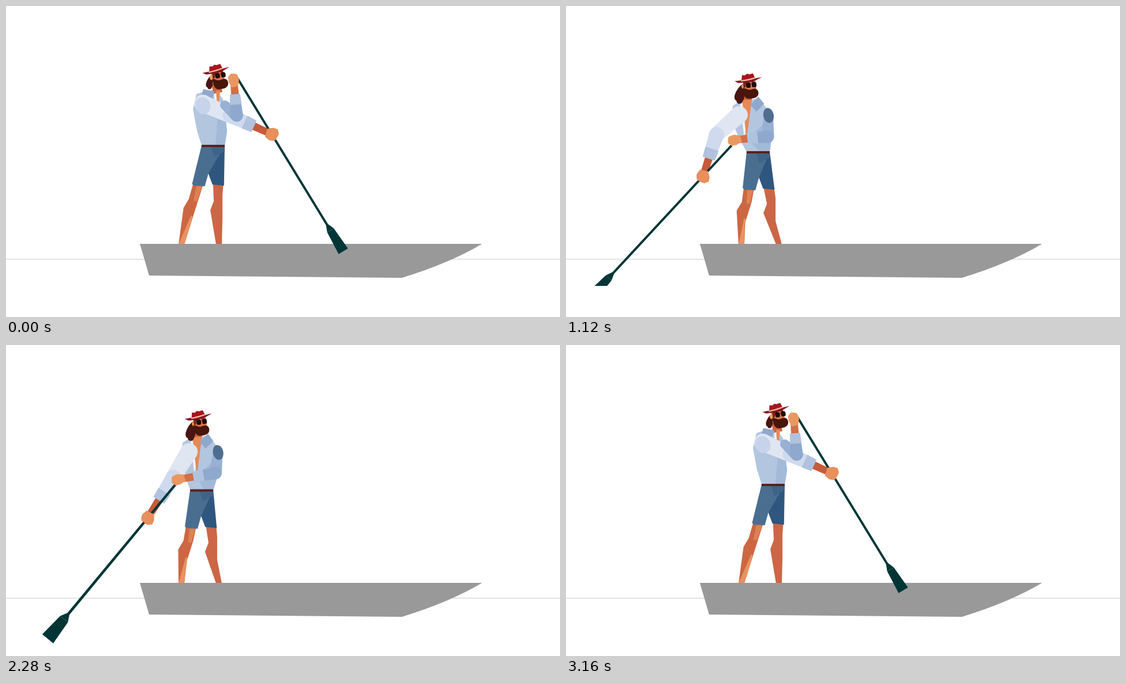
Recreate the animation shown at these times as an HTML page with a canvas. Size 960 by 540 pixels, loop 3240 ms.

```html
<!DOCTYPE html>
<html lang="en">
<head>
<meta charset="utf-8">
<title>Paddler</title>
<style>
html, body { margin: 0; width: 100%; height: 100%; overflow: hidden; background: #fff; }
canvas { display: block; width: 100%; height: 100%; }
</style>
</head>
<body>
<canvas id="stage" width="960" height="540"></canvas>
<script>
const ctx = document.getElementById('stage').getContext('2d');

// Head x, y, tilt; waist x, y; oar grip x, y, angle; oar swing towards the viewer;
// body turn towards the viewer; crouch. The rest of the body follows from these.
const REACH = [364, 112, -10, 359, 242, 399, 122, 58.6, 0, 0, 0];
const PLANT = [377, 127, -23, 345, 248, 425, 102, 68.8, 0, 0, 1];
const PULL = [341, 157, 9, 324, 258, 377, 174, 108, -.5, 0, 1];
const PUSH = [316, 128, -6, 333, 253, 287, 242, 132.8, 0, 1, 0];
const REST = [331, 125, -9, 338, 252, 281, 249, 134.7, 0, 1, 0];
const SWING = [350, 121, -9, 347, 248, 370, 192, 94.4, 1, .6, 0];
const KEYS = [[0, REACH], [320, PLANT], [640, PULL], [1120, PUSH],
              [1760, REST], [2200, REST], [2520, SWING], [3160, REACH]];

// Monotone cubic through the keys, so nothing overshoots a pose.
function poseAt(t) {
  const last = KEYS.length - 1;
  let k = 0;
  while (k < last - 1 && t >= KEYS[k + 1][0]) k++;
  const span = KEYS[k + 1][0] - KEYS[k][0], u = (t - KEYS[k][0]) / span;
  return REACH.map((_, c) => {
    const value = i => KEYS[i][1][c];
    const slope = i => (value(i + 1) - value(i)) / (KEYS[i + 1][0] - KEYS[i][0]);
    const tangent = i => {
      if (i < 1 || i >= last) return 0;
      const a = slope(i - 1), b = slope(i);
      return a * b <= 0 ? 0 : 2 * a * b / (a + b);
    };
    return value(k) + (value(k + 1) - value(k)) * u * u * (3 - 2 * u)
      + span * u * (1 - u) * (tangent(k) * (1 - u) - tangent(k + 1) * u);
  });
}

const off = ([x, y], dx, dy) => [x + dx, y + dy];
const mix = (a, b, k) => [a[0] + (b[0] - a[0]) * k, a[1] + (b[1] - a[1]) * k];
const angleOf = (a, b) => Math.atan2(b[1] - a[1], b[0] - a[0]);
const polar = ([x, y], angle, r) => [x + Math.cos(angle) * r, y + Math.sin(angle) * r];
const gap = (a, b) => Math.hypot(b[0] - a[0], b[1] - a[1]);

function poly(points, fill) {
  ctx.beginPath();
  for (const p of points) ctx.lineTo(...p);
  ctx.closePath();
  ctx.fillStyle = fill;
  ctx.fill();
}

function shape(path, fill) {
  ctx.fillStyle = fill;
  ctx.fill(new Path2D(path));
}

function oval([x, y], rx, ry, fill, turn = 0) {
  ctx.beginPath();
  ctx.ellipse(x, y, rx, ry, turn, 0, 7);
  ctx.fillStyle = fill;
  ctx.fill();
}

function taper(a, b, r1, r2, fill) {
  const side = angleOf(a, b) + Math.PI / 2;
  poly([polar(a, side, r1), polar(b, side, r2), polar(b, side, -r2), polar(a, side, -r1)], fill);
}

function local([x, y], angle, paint) {
  ctx.save();
  ctx.translate(x, y);
  ctx.rotate(angle);
  paint();
  ctx.restore();
}

function scene() {
  ctx.fillStyle = '#fff';
  ctx.fillRect(0, 0, 960, 540);
  ctx.fillStyle = '#ccc';
  ctx.fillRect(0, 439, 960, 1);
}

function drawLegs(waist, crouch) {
  const leg = (side, foot, bend) => {
    const hip = off(waist, side * 8, 8), ankle = [foot, 414];
    const knee = off(mix(hip, ankle, .54), bend * crouch, 0);
    return { ankle, knee, hem: mix(hip, knee, .69) };
  };
  const near = leg(-1, 304, 13), far = leg(1, 369, 17);
  const { hem, knee, ankle } = near, tilt = 1 - 6 * crouch;
  poly([off(far.hem, -9, -3), off(far.knee, -8, 0), off(far.knee, -14, 16), off(far.ankle, -5, 0),
        off(far.ankle, 5, 0), off(far.knee, 7, 30), off(far.knee, 7, -10), off(far.hem, 9, -3)], '#cb6646');
  poly([off(hem, -9, -3), off(knee, -9, -3), off(knee, -18, 12), off(ankle, -5, 0), off(ankle, 5, 0),
        off(knee, -3, 32), off(knee, 8, -3), off(hem, 9, -3)], '#cd6743');
  poly([off(knee, -5, 25), off(knee, -2, 27), off(knee, -4, 34), off(ankle, 5, 0), off(ankle, -5, 0)], '#e99260');
  taper(off(hem, 2, 0), off(knee, 2, 0), 5, 3, '#dd8152');

  const left = off(waist, -20, 0), right = off(waist, 20, 0), middle = off(waist, -4, 0);
  const crotch = off(mix(hem, far.hem, .5), 0, -20);
  poly([middle, right, off(far.hem, 10, tilt), off(far.hem, -10, -tilt), crotch], '#2f567f');
  poly([left, off(hem, -11, -2), off(hem, -8, 1), off(hem, 11, 2), crotch, mix(crotch, right, .5), right], '#4a6e90');
  poly([middle, right, off(right, 0, 10), off(middle, 6, 20)], '#3f6488');
}

function drawTorso(head, neck, waist, nearShoulder, farShoulder, turn, dip) {
  const left = off(waist, -20, 0), right = off(waist, 20, 0);
  const back = off(nearShoulder, -17 + 4 * turn, 10);
  const front = off(farShoulder, 0, 10), flank = off(mix(right, front, .4), 4, 0);
  const opening = [neck[0], neck[1] + (waist[1] - neck[1]) * (.45 + .3 * turn + .4 * dip)];
  const chest = [off(neck, -3 - 5 * turn, 0), off(neck, 4 + 5 * turn, 0), opening];
  poly([off(neck, -22 + 12 * turn, 1), off(nearShoulder, -11, -16), back, off(mix(back, left, .6), -2, 0),
        left, right, flank, front, off(farShoulder, -3, -10), off(neck, -3 + 24 * turn, -2)], '#b3c6df');
  poly([off(right, -16, 0), right, flank, front, opening], '#a2b9d8');
  poly(chest.map(p => off(p, -4, 0)), '#f1f5fa');
  taper(off(head, 0, 22), off(neck, 0, 4), 8, 8, '#cb633d');
  poly(chest, '#e58a57');
  local(off(neck, -17 + 36 * turn, 7), .2 - turn, () => shape('M-10 -8H10L8 8H-11Z', '#8fa9cd'));
  taper(off(left, 0, 1), off(right, 0, 1), 2, 2, '#5a211d');
}

function drawHead(head, tilt, turn, dip) {
  local(head, tilt * Math.PI / 180, () => {
    ctx.scale(1 + 1.1 * dip, 1 + .2 * dip);
    const hair = Math.max(0, .75 + .35 * turn - 2 * dip);
    local([-10, 9], 0, () => {
      ctx.scale(hair, hair);
      shape('M2 -4Q-10 2 -15 14Q-17 21 -13 23Q-13 29 -6 28Q0 22 1 14Z', '#481512');
    });
    shape('M-10 2H12V22H-8Z', '#db7547');
    oval([-10, 11], 3, 4, '#f0a05c');
    ctx.translate(1 - 2 * turn + 5 * dip, 0);
    shape('M-8 1H10V6L4 4L-3 6L-6 13H-9Z', '#6b2112');
    shape('M-10 13C-11 28 -7 34 1 33C10 34 16 31 16 24C16 17 10 16 6 17Q0 19 -5 15Z', '#48160a');
    shape('M-7 7L11 6V8H-7Z', '#d12a38');
    for (const x of [-4, 6]) {
      ctx.beginPath();
      ctx.roundRect(x, 5, 8, 9, 3);
      ctx.fillStyle = '#20090b';
      ctx.fill();
    }
    ctx.translate(2 * turn - 1 - 5 * dip, 0);
    shape('M-24 0Q0 0 24 -2L11 3Q-8 5 -18 4Z', '#87161f');
    shape('M-12 0L-10 -9L-5 -8Q-1 -12 2 -9L9 -10L12 -1Z', '#a8141f');
    shape('M-13 0Q0 -1 12 -3L13 -1Q0 2 -13 2Z', '#ecc0a0');
  });
}

const cuffOf = ({ elbow, hand }) => mix(elbow, hand, .46);

function drawSleeve(arm, [r1, r2, r3], upper, lower, trim, skin) {
  const { shoulder, elbow, hand } = arm, cuff = cuffOf(arm), along = angleOf(elbow, cuff);
  taper(cuff, hand, 7, 6, skin);
  oval(shoulder, r1, r1, upper);
  taper(shoulder, elbow, r1, r2, upper);
  oval(elbow, r2, r2, lower);
  taper(elbow, cuff, r2, r3, lower);
  taper(polar(cuff, along, -9), polar(cuff, along, 9), r3 + 1, r3, trim);
}

function drawHand(arm, length, width, fill) {
  local(arm.hand, angleOf(cuffOf(arm), arm.hand), () => {
    ctx.scale(length, width);
    shape('M-11 -6L-2 -12L6 -13L8 -10Q12 -7 11 -2L10 7Q7 11 0 12L-9 9Z', fill);
  });
}

// Two-bone reach with the elbow on the outer side.
function nearArm(shoulder, hand) {
  const upper = 52, lower = 76, d = Math.min(gap(shoulder, hand), upper + lower);
  const bend = Math.acos((d * d + upper * upper - lower * lower) / (2 * d * upper));
  return { shoulder, hand, elbow: polar(shoulder, angleOf(shoulder, hand) + bend, upper) };
}

// The far elbow hangs below the line from shoulder to hand.
function farArm(shoulder, hand) {
  const sag = 40 - .2 * gap(shoulder, hand);
  return { shoulder, hand, elbow: off(mix(shoulder, hand, .3), 16, sag) };
}

function drawFarArm(arm) {
  drawSleeve(arm, [8, 11, 9], '#98b0d3', '#8fa8cd', '#b0c3de', '#d07047');
  drawHand(arm, 1.1, .75, '#ea9862');
}

function drawOar(grip, angle, swing, submerged) {
  const closeness = Math.max(0, swing);
  const reach = 304 - 67 * swing, width = 2 + 2.5 * closeness;
  const half = 9.5 + 18 * swing, length = 52 + 13 * swing;
  ctx.save();
  if (submerged) {
    ctx.beginPath();
    ctx.rect(0, 0, 960, 486);
    ctx.clip();
  }
  local(grip, angle, () => {
    taper([0, 0], [reach, 0], 2, width, '#003536');
    taper([reach - 2, 0], [reach + length * .18, 0], width, half * .7, '#003536');
    taper([reach + length * .18, 0], [reach + length, 0], half * .7, half, '#003536');
  });
  ctx.restore();
}

function draw(t) {
  const [headX, headY, tilt, waistX, waistY, gripX, gripY, degrees, swing, turn, crouch] = poseAt(t);
  const head = [headX, headY], waist = [waistX, waistY], grip = [gripX, gripY];
  const angle = degrees * Math.PI / 180, lean = Math.cos(angle), dip = Math.max(0, -swing);
  const neck = off(head, 3 - 6 * turn - 16 * dip, 35 - 12 * dip);
  const nearShoulder = off(neck, -26 + 13 * turn, 22 + 4 * turn);
  const farShoulder = off(neck, 12 + 26 * turn, 25);
  const near = nearArm(nearShoulder, polar(grip, angle, 118 - 45 * turn));
  const far = farArm(farShoulder, off(grip, -8 * lean, 14 * lean));

  scene();
  drawLegs(waist, crouch);
  shape('M232 413H825Q770 446 686 472L248 468Z', '#999');
  // The released hand is still in the air while the other takes the grip.
  if (t >= 560 && t < 720) drawFarArm(farArm(farShoulder, [419, 138 - (640 - t) * .3]));
  drawTorso(head, neck, waist, nearShoulder, farShoulder, turn, dip);
  drawHead(head, tilt, turn, dip);
  drawSleeve(near, [15, 13, 11], '#dfe5f1', '#cfdaee', '#b0c2dd', '#c65a39');
  if (turn < .2) oval(off(nearShoulder, 0, 4), 13, 15, '#c6d3ea', -.3);
  drawOar(grip, angle, swing, t <= 2200);
  drawHand(near, 1, .95, '#e88f5b');
  drawFarArm(far);
  if (turn > .8) oval(off(farShoulder, 0, 2), 9, 13, '#4f6d90', -.2);
}

// Pictures last 80 ms each, apart from one long rest.
function pictureTime(ms) {
  const t = ms % 3240;
  if (t >= 1760 && t < 2280) return 1760;
  const base = t < 1760 ? 0 : 2280;
  return base + Math.floor((t - base) / 80) * 80;
}

const start = performance.now();
function tick() {
  draw(pictureTime(performance.now() - start));
  requestAnimationFrame(tick);
}
tick();
</script>
</body>
</html>
```
